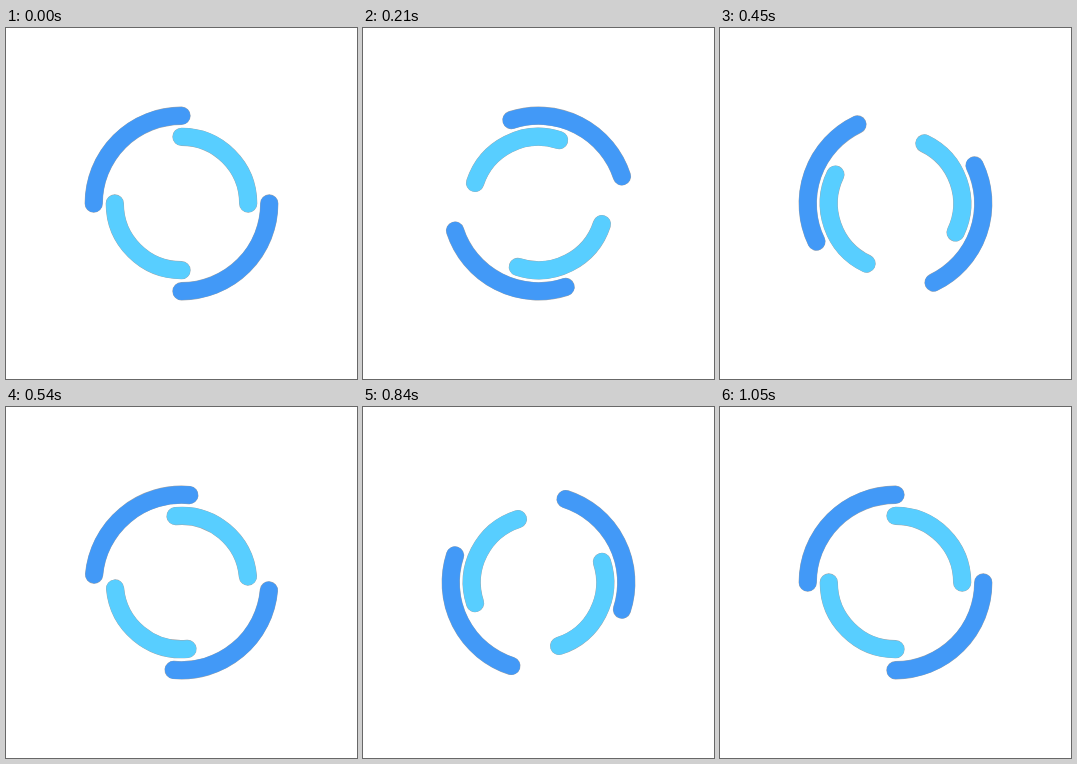
An HTML page for the animation above (1.08 s loop, 351 px wide and 351 px high).

```html
<!DOCTYPE html>
<html lang="en">
<head>
<meta charset="utf-8">
<title>Double ring spinner</title>
<style>
  html, body { margin: 0; height: 100%; overflow: hidden; background: #fff; }
  svg { display: block; width: 100vw; height: 100vh; }
  path { fill: none; stroke-linecap: round; }
  use { stroke-width: 5; }
  .rim { stroke: #a0a4a8; stroke-width: 5.2; }
</style>
</head>
<body>
<svg viewBox="-50 -50 100 100">
  <defs>
    <path id="wide" d="M25 0A25 25 0 0 1 0 25M-25 0A25 25 0 0 1 0-25"/>
    <path id="narrow" d="M0 19A19 19 0 0 1-19 0M0-19A19 19 0 0 1 19 0"/>
  </defs>
  <g id="outer"><use href="#wide" class="rim"/><use href="#wide" stroke="#4299f7"/></g>
  <g id="inner"><use href="#narrow" class="rim"/><use href="#narrow" stroke="#58ceff"/></g>
</svg>
<script>
const STEP = 30, STEPS = 36;
const outer = document.getElementById('outer');
const inner = document.getElementById('inner');
const start = performance.now();

function draw() {
  const step = Math.floor((performance.now() - start) / STEP) % STEPS;
  // The last step completes the turn, so the loop rests there for one step.
  const angle = 360 * step / (STEPS - 1);
  outer.setAttribute('transform', `rotate(${angle})`);
  inner.setAttribute('transform', `rotate(${-angle})`);
  requestAnimationFrame(draw);
}
draw();
</script>
</body>
</html>
```
